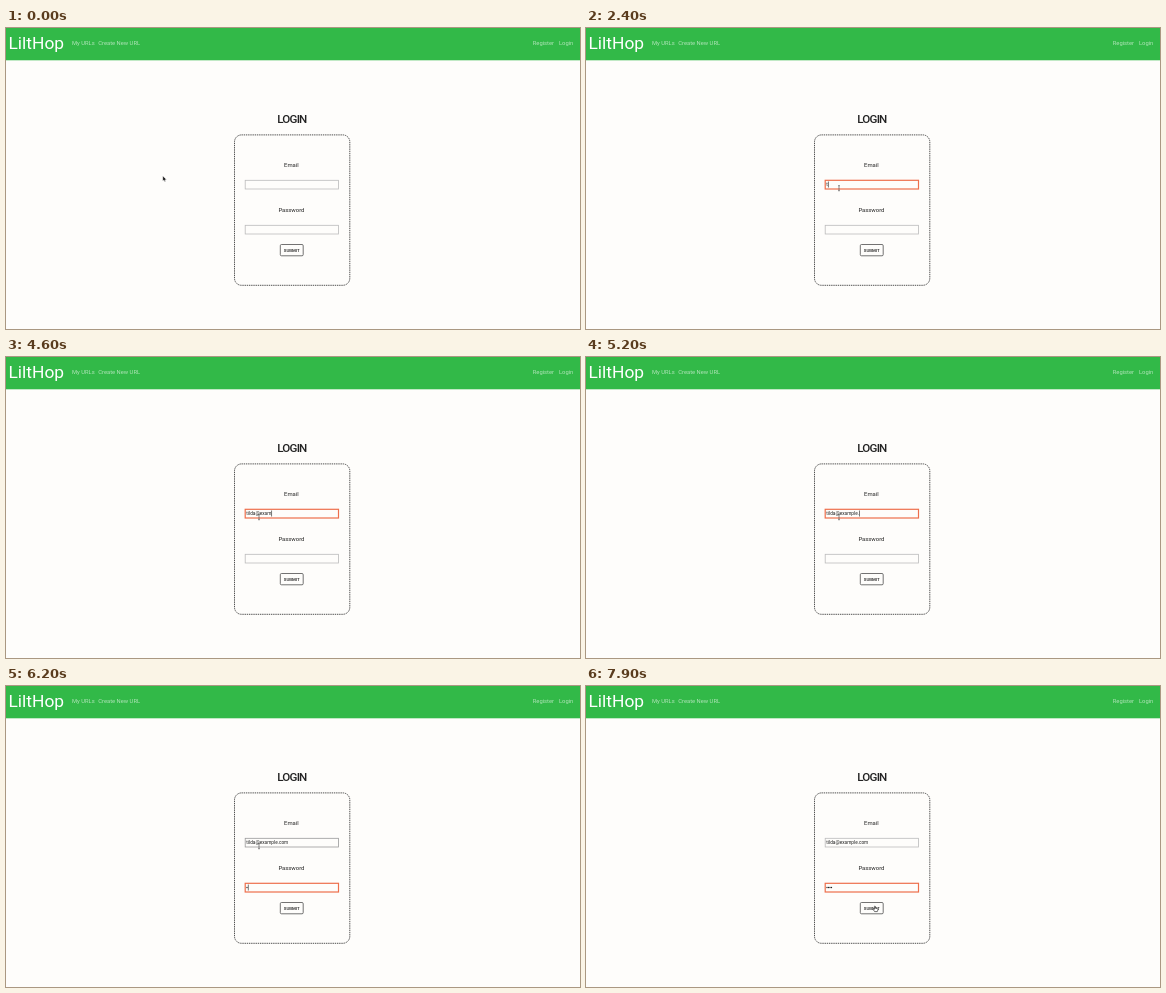
Recreate the animation shown at these times as an HTML page. Size 574 px wide and 301 px high, loop 8000 ms.

```html
<!DOCTYPE html>
<html lang="en">
<head>
<meta charset="utf-8">
<title>Login form</title>
<style>
  html, body { margin: 0; width: 100%; height: 100%; overflow: hidden; background: #fefdfb; }
  svg { display: block; width: 574px; height: 301px; }
  text { font-family: Roboto, sans-serif; fill: #222; white-space: pre; }
  .brand { font-size: 17.4px; fill: #fff; }
  .nav { font-size: 5.8px; fill: #fff; fill-opacity: .62; }
  .title { font-size: 11.6px; font-weight: 500; letter-spacing: -.8px; text-anchor: middle; }
  .label { font-size: 5.9px; text-anchor: middle; }
  .button { font-size: 4.4px; font-weight: 500; text-anchor: middle; }
  .typed { font-size: 4.75px; }
  .field { fill: none; stroke: #bbb; stroke-width: .8; }
  .field.hover { stroke: #999; }
  .field.focus { stroke: #ee6f4c; stroke-width: 1.2; }
</style>
</head>
<body>
<svg viewBox="0 0 574 301">
  <rect width="574" height="301" fill="#fefdfb"/>
  <rect width="574" height="32.3" fill="#32b948"/>
  <text class="brand" x="2.5" y="20.5">LiltHop</text>
  <text class="nav" x="66" y="17">My URLs</text>
  <text class="nav" x="92.3" y="17">Create New URL</text>
  <text class="nav" x="526.8" y="17">Register</text>
  <text class="nav" x="553" y="17">Login</text>

  <text class="title" x="285.9" y="95.4">LOGIN</text>
  <rect x="228.5" y="106.9" width="115.3" height="150.4" rx="7" fill="none"
        stroke="#333" stroke-width=".85" stroke-dasharray="1.4 .8"/>
  <text class="label" x="285.4" y="139">Email</text>
  <rect id="emailBox" class="field" x="239.2" y="152.3" width="93.3" height="8.7"/>
  <text id="emailText" class="typed" x="240.3" y="158.1"></text>
  <text class="label" x="285.4" y="184">Password</text>
  <rect id="passBox" class="field" x="239.2" y="197.3" width="93.3" height="8.7"/>
  <g id="dots" fill="#222"></g>
  <rect id="caret" width=".6" height="6" fill="#222"/>
  <rect x="274.3" y="216.5" width="22.9" height="11.3" rx="1.2" fill="none" stroke="#444" stroke-width=".75"/>
  <text class="button" x="285.8" y="223.8">SUBMIT</text>

  <g id="pointer">
    <path id="arrow" d="M0 0V5L1.2 4 2 5.7 2.8 5.3 2.1 3.7H3.7Z" fill="#111" stroke="#fff" stroke-width=".4"/>
    <path id="beam" d="M-1-2.7Q0-2.7 0-2V2Q0 2.7-1 2.7M1-2.7Q0-2.7 0-2M0 2Q0 2.7 1 2.7" fill="none" stroke="#444" stroke-width=".6"/>
    <path id="hand" d="M-.9-2.4Q-.4-3.2.1-2.4V-.6L2.2-.2Q2.8.1 2.6 1.1L2 2.8H-.7L-2.2.6Q-2-.2-.9.5Z" fill="#fff" stroke="#111" stroke-width=".6"/>
  </g>
</svg>
<script>
const LOOP = 8000, STEP = 100;
const EMAIL = "tilda@example.com";
const emailKeys = [2400, 2500, 2700, 2800, 2900, 3600, 3900, 4200, 4400,
                   4600, 4700, 4800, 4900, 5100, 5400, 5500, 5600];
const passKeys = [6200, 6300, 6500, 6700];
const START = [156.8, 148], FIELD = [253, 160.2], SUBMIT = [289.3, 222.8];

const el = id => document.getElementById(id);
const show = (node, on) => node.setAttribute("visibility", on ? "visible" : "hidden");
const countBefore = (keys, t) => keys.filter(k => k <= t).length;

// Eased share of a move whose first and last visible steps are given.
function progress(t, first, last) {
  const p = Math.min(1, Math.max(0, (t - first + STEP) / (last - first + STEP)));
  return p * p * (3 - 2 * p);
}
const mix = (a, b, p) => a.map((v, i) => v + (b[i] - v) * p);

el("dots").innerHTML = passKeys.map((_, i) =>
  `<circle cx="${241 + i * 1.5}" cy="201.5" r=".65"/>`).join("");

function render(time) {
  const t = Math.floor(time % LOOP / STEP) * STEP;
  const toField = progress(t, 800, 1300), toSubmit = progress(t, 7300, 7900);
  const [x, y] = toSubmit > 0 ? mix(FIELD, SUBMIT, toSubmit) : mix(START, FIELD, toField);

  const inField = top => x > 239 && x < 333 && y > top && y < top + 9.5;
  const overEmail = inField(152), overPass = inField(197);
  const overButton = x > 274 && x < 298 && y > 216 && y < 228;
  el("pointer").setAttribute("transform", `translate(${x} ${y})`);
  show(el("beam"), overEmail || overPass);
  show(el("hand"), overButton);
  show(el("arrow"), !overEmail && !overPass && !overButton);

  const emailFocus = t >= 1500 && t < 5800, passFocus = t >= 5800;
  const state = (focus, hover) => "field" + (focus ? " focus" : hover ? " hover" : "");
  el("emailBox").setAttribute("class", state(emailFocus, overEmail));
  el("passBox").setAttribute("class", state(passFocus, overPass));

  const typed = countBefore(emailKeys, t), hidden = countBefore(passKeys, t);
  el("emailText").textContent = EMAIL.slice(0, typed);
  [...el("dots").children].forEach((dot, i) => show(dot, i < hidden));

  const caretX = passFocus ? 240.4 + hidden * 1.5
    : 240.4 + (typed ? el("emailText").getComputedTextLength() : 0);
  el("caret").setAttribute("x", caretX);
  el("caret").setAttribute("y", passFocus ? 198.5 : 153.5);
  show(el("caret"), emailFocus || passFocus && t < 7000);
}

function frame() {
  render(performance.now());
  requestAnimationFrame(frame);
}
frame();
</script>
</body>
</html>
```
